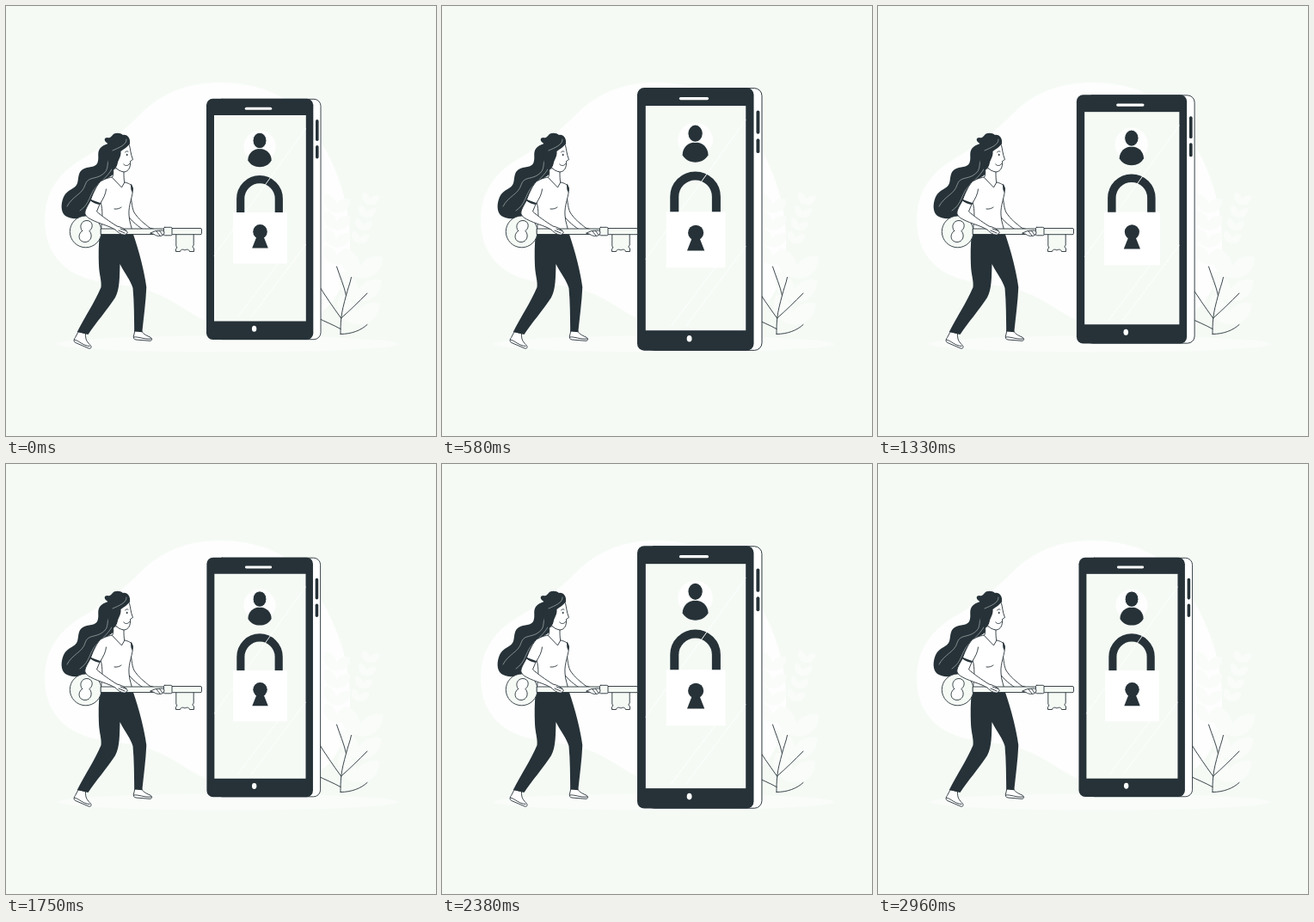
Animation of 500 by 500 pixels, one loop 3000 ms. Source, as an HTML page:

```html
<!DOCTYPE html>
<html lang="en">
<head>
<meta charset="utf-8">
<title>Unlocking a phone</title>
<style>
  html, body { margin: 0; width: 100%; height: 100%; overflow: hidden; background: #f5faf5; }
  svg { display: block; width: 100vw; height: 100vh; }
  .ink { fill: #263238; }
  .tint { fill: #f5faf5; }
  .pale { fill: #fdfefd; }
  .white { fill: #fff; }
  .line { stroke: #263238; stroke-width: .9; stroke-linecap: round; stroke-linejoin: round; }
  .open { fill: none; }
  .shine { fill: none; stroke: #fff; stroke-width: .9; }
  .strand { fill: none; stroke: #dfe6e2; stroke-width: .5; stroke-linecap: round; }
</style>
</head>
<body>
<svg viewBox="0 0 500 500">
  <!-- backdrop -->
  <path class="pale" d="M45 249C45 220 58 196 88 178C116 162 136 146 161 121C186 98 218 88 252 89C298 90 335 106 358 143C378 176 392 205 398 245C402 275 401 300 391 323C380 352 355 370 320 373C284 378 248 375 224 362C202 350 190 339 166 331C138 322 105 325 78 310C56 297 45 276 45 249Z"/>
  <ellipse cx="258" cy="393" rx="198" ry="9.5" fill="#fafcfa"/>
  <g id="leaves" fill="#f9fcf9"></g>
  <g class="line open">
    <path d="M384.500 303C388 314 393 325 395.500 336.500M401.500 315.500C400 323 397 330 395.500 336.500C393 346 390.500 355 389.800 363C389 370 389 376 389 381.500"/>
    <path d="M362 322C371 337 381 351 389.600 363M420 334C410 344 400 354 389.600 363"/>
    <path d="M362 362.500C371 367 381 371 389 375.500M389 381.500C402 381.500 413 377 420 370.500"/>
  </g>

  <g id="phone">
    <rect class="white line" x="243" y="108.300" width="123" height="279.400" rx="8"/>
    <rect class="ink" x="233" y="107.800" width="124.300" height="280.200" rx="7.500"/>
    <rect class="tint" x="242" y="127" width="106.800" height="239.500"/>
    <rect class="white" x="277.800" y="117.700" width="31.400" height="3" rx="1.500"/>
    <ellipse class="white" cx="288.600" cy="375.200" rx="2.700" ry="3.500"/>
    <rect class="ink" x="360" y="132" width="3.600" height="25" rx="1.800"/>
    <rect class="ink" x="360" y="162" width="3.600" height="15.500" rx="1.800"/>
    <circle class="pale" cx="295" cy="163.500" r="18.700"/>
    <path class="ink" d="M281.300 179.500C281.300 171.500 287.500 166 295 166C302.500 166 308.700 171.500 308.700 179.500C306 184.500 301 187.200 295 187.200C289 187.200 284 184.500 281.300 179.500Z"/>
    <ellipse class="ink" cx="295" cy="156.500" rx="8" ry="9.300" stroke="#fdfefd" stroke-width="1"/>
    <path d="M272.700 241V224A22.300 22.400 0 0 1 317.300 224V241" fill="none" stroke="#263238" stroke-width="9.200"/>
    <rect class="white" x="264" y="240" width="63" height="59.500"/>
    <path class="ink" d="M291.500 268H299.500L304.800 281.500H286.200Z"/>
    <circle class="ink" cx="295.500" cy="262.400" r="8.300"/>
    <path class="shine" d="M348.800 142L242 290.500M269 362L318 297M285 362L348.800 277"/>
  </g>

  <!-- hair -->
  <path class="ink" d="M119 160C114 158 113 153 118 153C121 154 122 152 124 150C126 147 133 147 136 150C141 149 145 154 144 160C143 165 138 168 134 169L127 192C125 197 120 199 115 202C110 205 108 209 107 213C104 222 101 232 97 241C90 248 76 249 69 244C63 239 64 229 67 222C71 213 81 213 83 206C85 199 83 193 91 189C99 186 106 188 107 180C108 175 106 171 109 166C111 163 115 161 119 160Z"/>
  <path class="strand" d="M121 170C116 184 121 190 112 196C104 202 95 198 92 208C89 219 77 221 71 233M125 186C120 197 111 203 105 210C96 220 98 230 86 238"/>

  <!-- legs and shoes -->
  <g class="line white">
    <path d="M84 379L80.500 385.500C78 389 79 391 82 392L96 398C98.500 398.800 100 397 98.500 395C95 391 92 389 92.500 381Z"/>
    <path d="M150 377L148.300 384.500C148 387.500 150 388 153 388.200L167 389.300C170 389.300 170.500 387 168 385.300C162 382.500 158.500 381 157.500 377Z"/>
    <path class="open" d="M79.500 388C85 389 89 395 97 395.500M148.500 385C154 384 160 388 169 387"/>
  </g>
  <path class="ink" d="M109 264C107.500 277 107.500 290 108 302C108.500 313 111.500 320 110.500 327C104 343 92 361 82.800 379L95.500 382C104 369 118 353 127 339C132.500 329 132 314 132.500 300C138 311 145 319 147.500 328C149 344 149 362 149.200 378.500L158.300 379.300C160 363 162.500 345 163.300 327C161 309 155 286 147.500 264Z"/>

  <!-- far arm -->
  <path class="white line" d="M144 213C146 224 146 234 149 240C154 248 161 253 167 258L178 261L175 265L163 262C154 257 146 250 141 243Z"/>

  <!-- torso -->
  <path class="white line" d="M124 199C116 200 110 203 107 208L110 228C113 238 112 248 110 265H147C147 258 143 251 143 243C142 232 148 220 147.500 212C146 207 142 206 138 205Z"/>
  <path class="ink" d="M145 206.500C147.500 208.500 148 212 146.500 217L145.300 213Z"/>
  <path class="line open" d="M126 236C129 236.500 132 235.500 134 234"/>

  <!-- head -->
  <path class="white line" d="M124.500 188C125 193 125 197 123.500 199.500L134.500 211L137.800 205C137 201 137 198 137 193Z"/>
  <path class="white" d="M128 169C133 166 140 164 143.500 161C145 167 144.500 171 147.500 178.500L144.500 180.500C145 187 143 192.500 137 193C131 192 128 189 125 187Z"/>
  <path class="line open" d="M143.500 162C145 167 144.500 171 147.500 178.500L144.500 180.500C145 187 143 192.500 137 193C132 192 129 190 127 187"/>
  <path class="ink" d="M118 160C124 151 140 149 143.800 157C143.500 164 137 166 133.500 169C134 175 131 178 130 182C129 187 127 190 124 191C117 185 116 169 118 160Z"/>
  <path class="strand" d="M140 155C141 161 131 165 124 168"/>
  <path class="line open" d="M138.500 170C140 168.500 141 168.700 142 169.300M136.700 184C139 186.500 142 186 143.500 183.500"/>
  <ellipse class="ink" cx="140.700" cy="173" rx=".8" ry="1.300"/>

  <!-- key -->
  <g class="tint line">
    <circle cx="92.700" cy="262.400" r="18.400"/>
    <path class="pale" d="M88.500 261.500C84.500 256 88 249.500 94 249.500C100.500 249.500 102.500 257 97 261.500C101.500 267 98.500 274.500 92 274.500C84.500 274.500 82.500 266 88.500 261.500Z"/>
    <path d="M110.500 259H186V265.500H110.500Z"/>
    <path d="M197.800 265V279L199 281L197.500 282.500V285.500H202.500C203 283 205.500 282.500 208 284C210.500 282.500 213 283 213.500 285.500H218.500V282L216.800 280L218.200 278V265Z"/>
    <rect x="192" y="258.500" width="35.500" height="7.200" rx="1.500"/>
    <rect x="183.500" y="257.300" width="9.500" height="9.500" rx="1.200"/>
  </g>

  <!-- near arm and hands -->
  <path class="white line" d="M99 225C95 232 91 238 92 242C94 248 108 252 121 257L127 260C131 264 135 266.500 139 266L141.500 263C138 259 134 257 129 256C121 251 111 244 105.500 239L110 228Z"/>
  <path class="white line" d="M111 203C106 207 102 216 98.500 225C102 228 106 229.500 109.500 229.800C113 224 116 219 116.500 213"/>
  <path class="ink" d="M98.500 225L109.500 229L109 231C104 230 101 228.500 98.200 226.500Z"/>
  <path class="line open" d="M131 261L138 264M133 259L140 261.500"/>
  <path class="white line" d="M168 264L174 261.500L182 261C184.500 262 184.500 264 182.500 266.500C179 268 176 268 172 265.500Z"/>
  <path class="line open" d="M175 262L179 267M178.500 261.500L182 266"/>
</svg>
<script>
  const leaves = document.getElementById("leaves");
  const phone = document.getElementById("phone");

  const leaf = (x, y, size, angle) => leaves.insertAdjacentHTML("beforeend",
    `<path transform="translate(${x} ${y}) rotate(${angle}) scale(${size})" d="M0 0C-.4 -.3 -.3 -.8 0 -1C.3 -.8 .4 -.3 0 0Z"/>`);

  // pairs of leaves up a slanting stem
  function sprig(x, y, dx, dy, size, count) {
    for (let i = 0; i < count; i++) {
      leaf(x + dx * i, y + dy * i, size, 50);
      leaf(x + dx * i, y + dy * i, size, -25);
    }
  }
  sprig(405, 370, 2, -27, 38, 3);
  sprig(410, 276, 4, -15, 16, 4);
  sprig(382, 300, 0, -20, 24, 4);

  const loop = 3000, cx = 299.6, cy = 248;
  const beats = [[0, 1], [.2, 1.1], [.4, 1.055], [.6, 1], [.8, 1.1], [1, 1]];

  function beat(p) {
    const k = Math.max(1, beats.findIndex(b => b[0] >= p));
    const [a, va] = beats[k - 1], [b, vb] = beats[k];
    return va + (vb - va) * (p - a) / (b - a);
  }

  const drawnAt = beat(1 / 72);
  const startOf = i => Math.round(i * 25 / 6) * 10;

  // 24 steps a second, each starting on a 10 ms mark
  function draw(now) {
    const t = now % loop;
    let i = Math.min(71, Math.floor(t * .024 + .2));
    if (startOf(i) > t) i--;
    const s = beat((i + 1) / 72) / drawnAt;
    phone.setAttribute("transform", `translate(${cx} ${cy}) scale(${s}) translate(${-cx} ${-cy})`);
  }

  let start;
  function tick(now) {
    start ??= now;
    draw(now - start);
    requestAnimationFrame(tick);
  }
  draw(0);
  requestAnimationFrame(tick);
</script>
</body>
</html>
```
